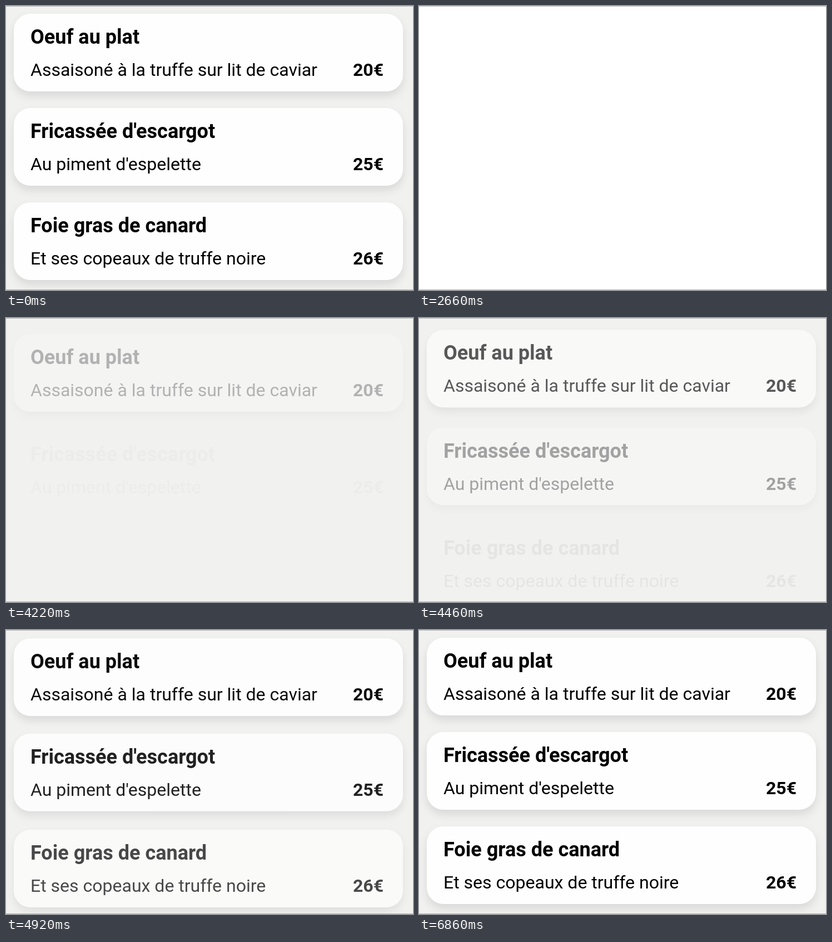
Write an HTML page that moves like this. It is 732 px wide and 512 px high and loops after 7440 ms.

```html
<!DOCTYPE html>
<html lang="fr">
<head>
<meta charset="utf-8">
<title>Menu</title>
<style>
  html, body { margin: 0; width: 100%; height: 100%; overflow: hidden; background: #fff; }
  svg { display: block; width: 732px; height: 512px; }
  text { font-family: Roboto, Arial, sans-serif; font-size: 32px; }
  .title { font-size: 36px; font-weight: 700; }
  .price { font-weight: 700; text-anchor: middle; }
  .panel { fill: #fefefe; filter: drop-shadow(0 8px 8px rgba(0, 0, 0, .1)); }
</style>
</head>
<body>
<svg viewBox="0 0 732 512">
  <rect id="page" width="732" height="512"/>
  <g id="cards"></g>
  <path d="M0 .5H732M0 511.5H732" stroke="#b4b4b4"/>
</svg>
<script>
  const LOOP = 7440, CLEAR = 2660, RELOAD = 3800;
  const FIRST_CARD = 3985, STAGGER = 200, DURATION = 1300, RISE = 20;
  const PITCH = 170;
  const dishes = [
    ["Oeuf au plat", "Assaisoné à la truffe sur lit de caviar", "20€"],
    ["Fricassée d'escargot", "Au piment d'espelette", "25€"],
    ["Foie gras de canard", "Et ses copeaux de truffe noire", "26€"]
  ];

  const page = document.getElementById("page");
  const holder = document.getElementById("cards");

  function add(parent, tag, attrs, content = "") {
    const node = document.createElementNS("http://www.w3.org/2000/svg", tag);
    for (const key in attrs) node.setAttribute(key, attrs[key]);
    node.textContent = content;
    return parent.appendChild(node);
  }

  const cards = dishes.map(([title, detail, price]) => {
    const card = add(holder, "g", {});
    add(card, "rect", { class: "panel", x: 14, y: 14, width: 700, height: 140, rx: 30 });
    add(card, "text", { class: "title", x: 44, y: 68 }, title);
    add(card, "text", { x: 44, y: 126 }, detail);
    add(card, "text", { class: "price", x: 651.5, y: 126 }, price);
    return card;
  });

  // CSS "ease": cubic-bezier(.25, .1, .25, 1)
  function ease(x) {
    if (x <= 0) return 0;
    if (x >= 1) return 1;
    const curve = (a, b, s) => 3 * a * s * (1 - s) ** 2 + 3 * b * s * s * (1 - s) + s ** 3;
    let low = 0, high = 1;
    for (let i = 0; i < 24; i++) {
      const mid = (low + high) / 2;
      if (curve(.25, .25, mid) < x) low = mid; else high = mid;
    }
    return curve(.1, 1, low);
  }

  function render(time) {
    const blank = time >= CLEAR && time < RELOAD;
    page.setAttribute("fill", blank ? "#fff" : "#f1f1f0");
    cards.forEach((card, i) => {
      const start = FIRST_CARD + i * STAGGER;
      const shown = time < CLEAR ? 1 : ease((time - start) / DURATION);
      card.setAttribute("opacity", shown);
      card.setAttribute("transform", `translate(0 ${i * PITCH + RISE * (1 - shown)})`);
    });
  }

  const origin = performance.now();
  function tick() {
    render((performance.now() - origin) % LOOP);
    requestAnimationFrame(tick);
  }
  tick();
</script>
</body>
</html>
```
